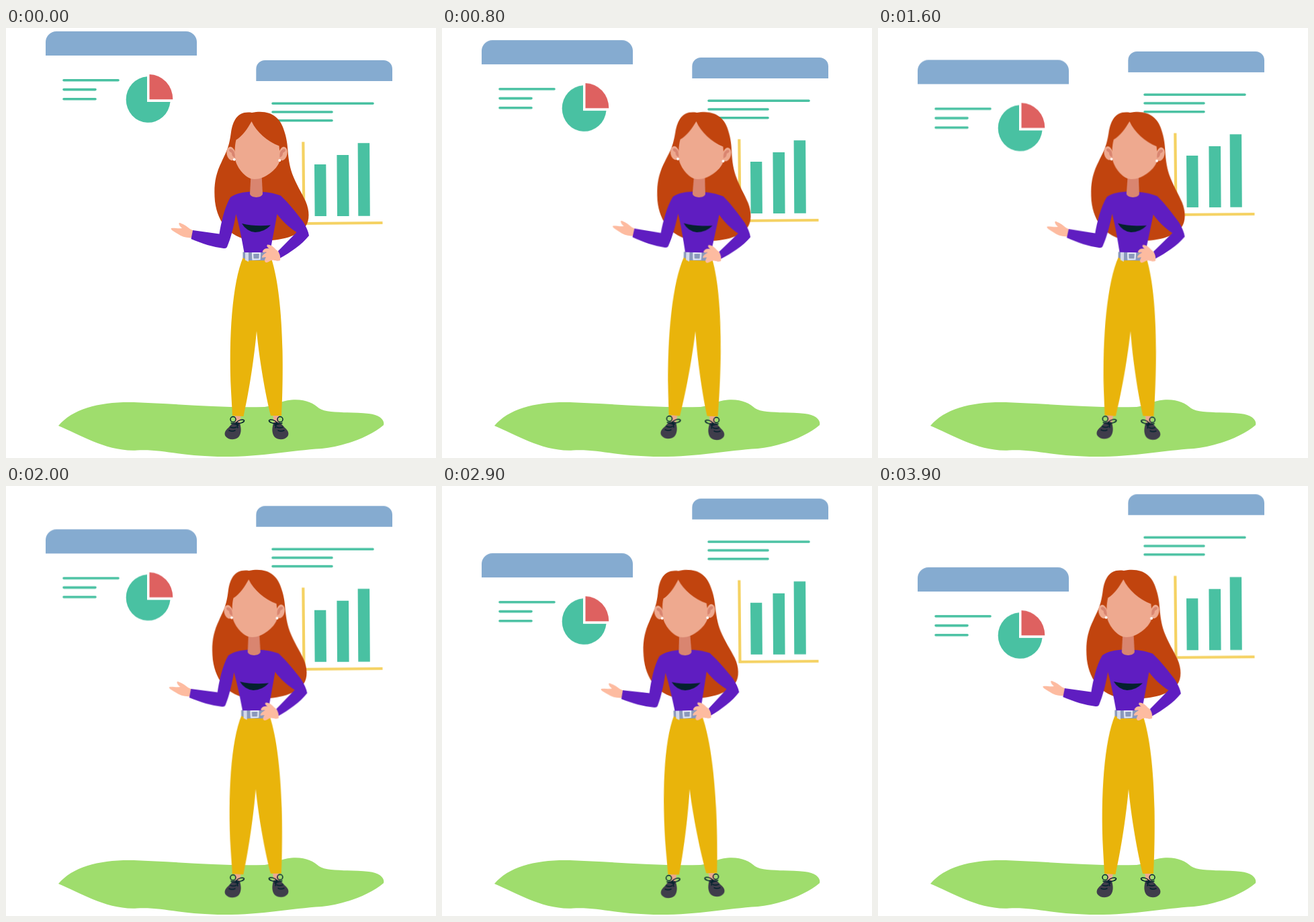
Recreate the animation shown at these times as an HTML page without scripts. Size 640 by 640 pixels, loop 4 s.

```html
<!DOCTYPE html>
<html lang="en">
<head>
<meta charset="utf-8">
<title>Presenter with charts</title>
<style>
  html, body { margin: 0; width: 100%; height: 100%; overflow: hidden; background: #fff; }
  svg { display: block; width: 100vw; height: 100vh; }

  .header { fill: #85abd0; }
  .teal { fill: #49c1a2; }
  .lines { fill: none; stroke: #49c1a2; stroke-width: 3.6; stroke-linecap: round; }
  .axis { fill: none; stroke: #f5d263; stroke-width: 4.2; }
  .hair { fill: #c1440e; }
  .skin { fill: #eea98f; }
  .shade { fill: #d98570; }
  .hand { fill: #fdbba0; }
  .top { fill: #5f1dc1; }
  .dark { fill: #04222e; }
  .lace { fill: none; stroke: #04222e; stroke-width: 1.5; stroke-linecap: round; }

  .drop, .rise { animation: 4s cubic-bezier(.31, 0, .67, 1) infinite; }
  .drop { animation-name: drop; }
  .rise { animation-name: rise; }
  .sway {
    transform-origin: 373px 598px;
    animation: sway 4s cubic-bezier(.333, 0, .667, 1) infinite;
  }
  @keyframes drop { to { transform: translateY(116.3px); } }
  @keyframes rise { to { transform: translateY(-35.8px); } }
  @keyframes sway {
    0%, 100% { transform: rotate(0deg); }
    25%, 31.25% { transform: rotate(1.8deg); }
    62.5%, 68.75% { transform: rotate(-1.8deg); }
  }
</style>
</head>
<body>
<svg viewBox="0 0 640 640">
  <path fill="#9fdd6d" d="M78 592C100 566 140 556 190 557C250 559 320 566 385 564C400 562 408 555 425 553.5C445 552 457 558 466 566C478 574 510 571 540 574C556 576 564 583 562 591C540 610 500 623 470 626C420 629 380 639 315 638C250 636 235 627 195 628.500C150 631 110 605 78 592Z"/>

  <g class="drop">
    <path class="header" d="M59 41V21A16 16 0 0 1 75 5H268A16 16 0 0 1 284 21V41Z"/>
    <path class="lines" d="M86 77.700H167M86 91.600H133M86 105.800H133"/>
    <path class="teal" d="M210 72.300A33 34.300 0 1 0 244.500 110H210Z"/>
    <path fill="#de6160" d="M213.500 69A35 37 0 0 1 248.300 106.200H213.500Z"/>
  </g>

  <g class="rise">
    <path class="header" d="M372.300 79V61A13 13 0 0 1 385.300 48H562A13 13 0 0 1 575 61V79Z"/>
    <path class="lines" d="M397 112.200H546M397 125H485M397 137.800H485"/>
    <path class="axis" d="M442.300 169.500L443.500 291L560.500 290"/>
    <path class="teal" d="M459 203h17.300l.600 77h-17.300ZM492.400 189h17.600l.600 91h-17.600ZM523.600 171.300h17.500l.700 108.400h-17.500Z"/>
  </g>

  <g class="sway">
    <path class="hair" d="M366 126C345 123 338 137 335 155C332 178 328 184 321 199C311 219 309 236 311 258C315 290 334 316 375 317C402 317 433 313 446 295C452 286 452 272 446 258C440 245 432 233 426 217C417 190 422 176 414 153C408 133 394 121 366 126Z"/>

    <g id="legs">
      <path class="skin" d="M341 575h9l-2 13h-7ZM397 575h9v13h-7Z"/>
      <path fill="#e9b40b" d="M353 341C337 378 331 460 335 541L337 577L353.500 578C363 535 370 485 373 451C377 493 386 545 394 577H410C412 540 412 500 411.500 480C410 420 405 375 395 343Z"/>
      <g id="shoe">
        <path fill="#3f3d4b" d="M337 588C342 586 346 586 348 588C350 595 351 603 346 609C340 614 331 613 327 608C324 604 326 599 331 595Z"/>
        <circle class="lace" cx="338" cy="582.500" r="4"/>
        <path class="lace" d="M342 588C346 583 352 582 354.500 584C355 587 346 590 342 588M335 588L346 591M334 594Q339 596 343 594M332 599Q337 601 341 599M343 587L345 595"/>
      </g>
      <use href="#shoe" transform="matrix(-1 0 0 1 746 0)"/>
    </g>

    <path fill="#8a98bb" d="M352.500 333.500L392 334V346L361 346L352.500 342Z"/>
    <path fill="#d3d9ea" d="M356 331.500L361 333V348L356 345.500Z"/>
    <path fill="#8a98bb" stroke="#e6eaf5" stroke-width="2.200" d="M367 335.200L378 334.700L377.500 344L367.500 344.300Z"/>

    <path class="hand" d="M278 301C272 299 268 293 261 291C256 288 256 293 262 298C256 299 250 297 246 298C244 300 250 303 255 306C262 311 270 313 277 312Z"/>
    <path class="top" d="M334 252C342 246 354 244 366 243.500C382 243 398 245 409 249.500C420 260 432 275 442 288C447 296 450 303 451 309C440 323 423 334 408 342.500L405 332L432.500 304C420 296 411 287 403.500 277C400 297 396 317 393 334H354.500C351 314 347 294 342.300 277C339 295 335 312 329 326Q328 328.500 324 328C308 326 292 321 275.500 314L278 301L317.500 306.500C320 291 325 267 334 252Z"/>
    <path class="dark" d="M351 291Q371 296 394 293.500Q384 304 371 304Q358 303 351 291Z"/>
    <path class="hand" d="M408 346C409 340 407 333 402 330C398 325 393 322 389 322.500C387 325 390 327 392 328.500C387 327 383 329 381.500 333C384 335 386 333 388 334C384 336 381 339 381 341.500C383 342 385 341 387 341C385 344 384 348 387 349C391 349 394 345 398 345.500C402 347 405 347 408 346Z"/>

    <path class="shade" d="M364.500 218H380.500L382 247C380 253.500 365 253.500 363 247Z"/>
    <ellipse class="skin" cx="335" cy="187" rx="6.500" ry="10.300" transform="rotate(-12 335 187)"/>
    <ellipse class="skin" cx="412.300" cy="187" rx="6.300" ry="10.300" transform="rotate(12 412.300 187)"/>
    <path class="shade" d="M332 181C335 178 340 182 341 189V193C338 192 336 190 336 186C334 184 332 185 332 181ZM416 181C413 178 408 182 407 189V193C410 192 412 190 412 186C414 184 416 185 416 181Z"/>
    <path class="skin" d="M365.500 139C360 149 352 161 342.500 166.500C340 176 340 190 342 199C346 211 358 225 370 225C385 225 403 211 407 199C408 190 407 181 406.500 175.500C389 169 373 155 365.500 139Z"/>
    <g fill="#fff">
      <circle cx="339.800" cy="195.700" r="2"/>
      <circle cx="407.300" cy="197" r="2"/>
    </g>
  </g>
</svg>
</body>
</html>
```
